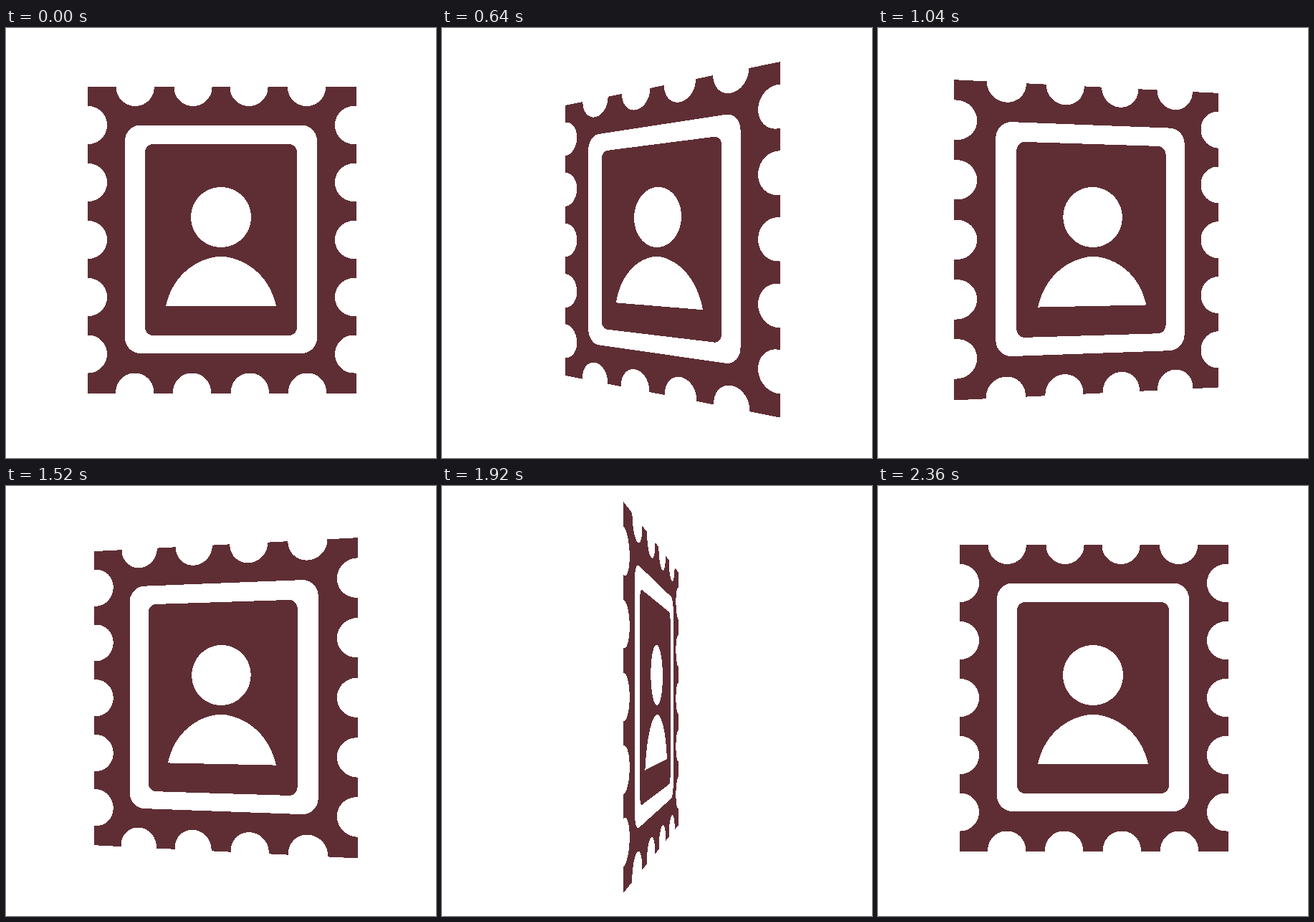
An HTML page that plays this animation: 600x600 px, repeating every 2400 ms.

```html
<!DOCTYPE html>
<html lang="en">
<head>
<meta charset="utf-8">
<title>Turning stamp</title>
<style>
  html, body { margin: 0; width: 100%; height: 100%; overflow: hidden; background: #fff; }
  svg { display: block; width: 600px; height: 600px; }
</style>
</head>
<body>
<svg id="stage" viewBox="0 0 600 600" shape-rendering="crispEdges"></svg>
<script>
const LOOP = 2400, STEP = 40, FIRST_TURN = 120, HALF_TURN = 1080;
const CENTER = 300, DEPTH = 850;
const INK = "#5f2e35", PAPER = "#fff";
const stage = document.getElementById("stage");

// Outlines are lists of [x, y] points on the flat stamp.
function sample(from, to, count, point) {
  return Array.from({ length: count + 1 }, (_, i) => point(from + (to - from) * i / count));
}

function arc(cx, cy, r, from, to) {
  const count = Math.max(8, Math.ceil(r * (to - from)));
  return sample(from, to, count, a => [cx + r * Math.cos(a), cy + r * Math.sin(a)]);
}

function roundRect(left, top, right, bottom, r) {
  const corner = (x, y, quarter) =>
    arc(x, y, r, quarter * Math.PI / 2, (quarter + 1) * Math.PI / 2);
  return [
    ...corner(right - r, bottom - r, 0), ...corner(left + r, bottom - r, 1),
    ...corner(left + r, top + r, 2), ...corner(right - r, top + r, 3)
  ];
}

function quad(a, b, c) {
  return sample(0, 1, 24, t => [0, 1].map(k =>
    (1 - t) ** 2 * a[k] + 2 * t * (1 - t) * b[k] + t * t * c[k]));
}

function shoulders() {
  const half = [
    ...quad([223, 388], [230, 358], [250, 340]),
    ...quad([250, 340], [271, 321], [300, 318.5])
  ];
  return [...half, ...half.map(([x, y]) => [2 * CENTER - x, y]).reverse()];
}

const R = 26.5;
const columns = (centers, top, bottom) =>
  centers.map(x => roundRect(x - R, top, x + R, bottom, R));
const rows = (left, right) =>
  [135.5, 215.5, 295.5, 375.5, 455].map(y => roundRect(left, y - R, right, y + R, R));

const layers = [
  [INK, [[[114, 82], [489, 82], [489, 510], [114, 510]]]],
  [PAPER, [
    ...rows(79, 141), ...rows(459, 521),
    ...columns([180.3, 261, 339, 419.5], 47, 109),
    ...columns([179.7, 259.5, 340.3, 420.5], 481.5, 543.5),
    roundRect(166, 135.5, 434, 454, 22)
  ]],
  [INK, [roundRect(194, 162, 406, 429, 11.5)]],
  [PAPER, [arc(300, 264, 42, 0, 2 * Math.PI), shoulders()]]
].map(([fill, outlines]) => {
  const path = document.createElementNS("http://www.w3.org/2000/svg", "path");
  path.setAttribute("fill", fill);
  stage.append(path);
  return { path, outlines };
});

// cubic-bezier(.78, 0, .598, 1)
function ease(x) {
  let low = 0, high = 1, s;
  for (let i = 0; i < 30; i++) {
    s = (low + high) / 2;
    const r = 1 - s;
    if (3 * .78 * s * r * r + 3 * .598 * s * s * r + s ** 3 < x) low = s;
    else high = s;
  }
  return s * s * (3 - 2 * s);
}

function angleAt(time) {
  const turns = Math.min(2, Math.max(0, (time - FIRST_TURN) / HALF_TURN));
  const done = Math.floor(turns);
  return Math.PI * (done + ease(turns - done));
}

function draw(now) {
  const angle = angleAt(Math.floor((now % LOOP) / STEP) * STEP);
  const cos = Math.cos(angle), sin = Math.sin(angle);
  const project = ([x, y]) => {
    const scale = DEPTH / (DEPTH - (x - CENTER) * sin);
    const px = CENTER + (x - CENTER) * cos * scale;
    const py = CENTER + (y - CENTER) * scale;
    return px.toFixed(2) + " " + py.toFixed(2);
  };
  for (const { path, outlines } of layers) {
    path.setAttribute("d", outlines.map(o => "M" + o.map(project).join("L") + "Z").join(""));
  }
  requestAnimationFrame(draw);
}
draw(0);
</script>
</body>
</html>
```
